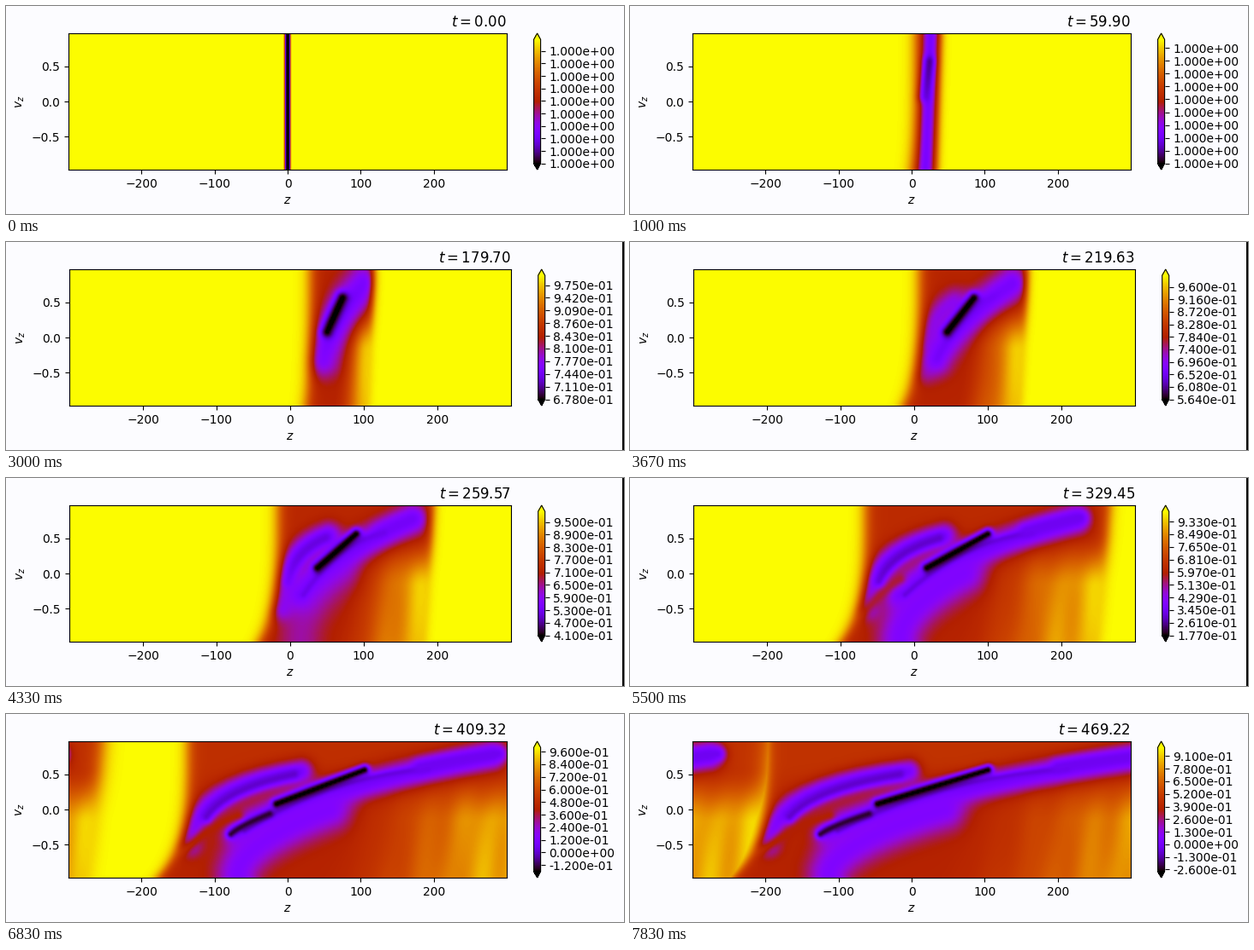
Write a matplotlib script that moves like this. It is 722 px wide and 244 px high and loops after 8 s.

```python
import math

import matplotlib.pyplot as plt
import numpy as np
from matplotlib.animation import FuncAnimation
from matplotlib.colors import ListedColormap
from matplotlib.patches import Rectangle

W, H, DPI = 722, 244, 100
FRAMES, INTERVAL = 48, 166.5
DT = 469.22 / 47
PERIOD, VMAX = 600, 0.966
KX, KY = 0.857, 82.8            # pixels per unit of z and v

# Curves through three points (s, v), s running from 0 to 1 across the wave.
# birth frame, points, level, width in pixels
FILAMENTS = [
    (6, [(0.14, -0.30), (0.42, 0.24), (0.86, 0.76)], 0.23, 17),    # body
    (22, [(0.14, -0.97), (0.20, -0.50), (0.40, 0.0)], 0.26, 25),   # lower lobe
    (18, [(0.0, -0.48), (0.09, 0.17), (0.32, 0.54)], 0.24, 14),    # upper arm
    (27, [(-0.07, -0.88), (0.04, -0.37), (0.14, -0.08)], 0.5, 7),  # slit
    (20, [(0.16, -0.30), (0.40, 0.28), (0.68, 0.58)], 0.17, 4),    # trail
    (1, [(0.25, 0.08), (0.37, 0.31), (0.50, 0.56)], -0.03, 6),     # core
    (20, [(0.05, -0.10), (0.14, 0.25), (0.30, 0.50)], 0.15, 7),
    (33, [(0.12, -0.35), (0.16, -0.22), (0.23, -0.06)], 0.03, 5),
    (22, [(0.66, 0.60), (0.75, 0.69), (0.88, 0.79)], 0.2, 9),      # tip
]

NX, NY = 340, 80
Z, V = np.meshgrid((np.arange(NX) + 0.5) / NX * PERIOD - PERIOD / 2,
                   ((np.arange(NY) + 0.5) / NY * 2 - 1) * VMAX)
DROP = (VMAX - V) / (2 * VMAX)


def unit(x):
    return np.clip(x, 0, 1)


def smooth(x):
    x = unit(x)
    return x * x * (3 - 2 * x)


def sigmoid(x):
    return 0.5 * (1 + np.tanh(x / 2))


def curve_distance(x, y, pts, n=10):
    """Squared distance to the parabola through three points."""
    a, m, b = pts
    ctrl = 2 * m - (a + b) / 2
    s = np.linspace(0, 1, n + 1)[:, None]
    path = (1 - s) ** 2 * a + 2 * s * (1 - s) * ctrl + s ** 2 * b
    best = np.full(x.shape, np.inf)
    for p, q in zip(path[:-1], path[1:]):
        d = q - p
        k = unit(((x - p[0]) * d[0] + (y - p[1]) * d[1]) / (d @ d + 1e-9))
        best = np.minimum(best, (x - p[0] - k * d[0]) ** 2
                          + (y - p[1] - k * d[1]) ** 2)
    return best


def edges(f):
    """Left and right end of the wave: drift at first, then it spreads."""
    g = max(f - 18, 0)
    left = -3.8 + 1.8 * min(f, 18) - 4.6 * g - 0.11 * g * g
    right = 3.8 + 6.1 * f + 4 * g
    return left, right


def depth(z, f):
    """How far the wave lowers the field, from 0 to 1."""
    g = max(f - 18, 0)
    start, young = unit(f / 3), unit((16 - f) / 10)
    z0, z1 = edges(f)
    size = z1 - z0
    left = z0 - min(f, 6 + 4.5 * g, 55) * DROP ** 4
    right = z1 - (min(f, 6) + 0.5 * g) * DROP

    s = (z - left) / (right - left)
    glow = smooth((s - 0.42) / 0.55) * smooth((0.6 - V) / 0.8) * unit((f - 6) / 12)
    streaks = np.sin((right - z) / 7 + V) + np.sin((right - z) / 11.3 - 2 * V)
    u = start * (0.52 + 0.0022 * g * smooth((V + 0.1) / 0.8))
    u = u + glow * (0.37 + 0.025 * streaks)

    column = (z - z0 - 0.45 * size - 4 * V * start) * KX / min(4 + f, 10)
    u += (0.2 * start - u) * young * np.exp(-column ** 2)

    x, y = z * KX, V * KY
    swell = 1 + 0.3 * math.exp(-g / 6)
    for birth, pts, value, width in FILAMENTS:
        fade = unit((f - birth) / 8)
        if fade > 0:
            path = (np.array(pts) * (size, 1) + (z0, 0)) * (KX, KY)
            dist = curve_distance(x, y, path)
            u += (value - u) * fade * np.exp(-dist / (width * swell) ** 2)

    soft = min(0.4 + 0.7 * f, 4.5)
    mask = sigmoid((z - left) * KX / soft)
    mask *= sigmoid((right - z) * KX / (0.6 * soft + 0.006 * g * g))
    return (1 - u) * mask


def density(f):
    """Field scaled to 0..1; the box is periodic in z."""
    low = depth(Z, f)
    if edges(f)[1] > PERIOD / 2 - 20:
        low = np.maximum(low, depth(Z + PERIOD, f))
    return unit(1 - low)


def value_range(f):
    spans = [1.19e-6, 4.06e-5, 0.322, 0.59, 0.823, 1.18, 1.28]
    return math.exp(np.interp(f, [0, 6, 18, 26, 33, 41, 47], np.log(spans)))


def bar_ticks(span):
    """About ten tick values, always through zero when it is in range."""
    raw = span / 120
    step = round(raw, -math.floor(math.log10(raw)))
    digits = -math.floor(math.log10(step) + 1e-9)
    low = round(1 - span, digits)
    levels = low + step * np.arange(math.ceil((1 - low) / step - 1e-6) + 1)
    stride = math.ceil(len(levels) / 10)
    first = min(range(stride), key=lambda i: abs(levels[i::stride]).min())
    ticks = np.round(levels[first::stride], digits) + 0.0
    return ticks[ticks <= 1]


def box(x0, x1):
    return [x0 / W, 52 / H, (x1 - x0) / W, 160 / H]


colors = plt.get_cmap("gnuplot")(np.linspace(0, 1, 256))
cmap = ListedColormap(colors * [252 / 255, 252 / 255, 1, 1])

fig = plt.figure(figsize=(W / DPI, H / DPI), dpi=DPI, facecolor="#fcfcff")
ax = fig.add_axes(box(73, 585))
cax = fig.add_axes(box(616.6, 624.6))
img = ax.imshow(density(0), cmap=cmap, vmin=0, vmax=1, origin="lower",
                aspect="auto", interpolation="bilinear",
                extent=(-PERIOD / 2, PERIOD / 2, -VMAX, VMAX))
ax.set_xticks([-200, -100, 0, 100, 200])
ax.set_yticks([-0.5, 0, 0.5])
ax.set_xlabel("$z$")
ax.set_ylabel("$v_z$")
title = ax.set_title("", loc="right")
bar = fig.colorbar(img, cax=cax, extend="both")
strip = fig.add_artist(Rectangle((720 / W, 0), 2 / W, 1, color="black", lw=0,
                                 transform=fig.transFigure))


def update(f):
    span = value_range(f)
    wide = span < 7e-4 or span > 1
    ax.set_position(box(73, 585) if wide else box(74, 590))
    cax.set_position(box(616.6, 624.6) if wide else box(621.7, 629.7))
    strip.set_visible(not wide)

    img.set_data(density(f))
    title.set_text(f"$t = {f * DT:.2f}$")
    ticks = bar_ticks(span)
    bar.set_ticks((ticks - 1 + span) / span, labels=[f"{v:.3e}" for v in ticks])
    return img, title, strip


anim = FuncAnimation(fig, update, frames=FRAMES, interval=INTERVAL,
                     repeat=True, repeat_delay=0, blit=False)
plt.show()
```
